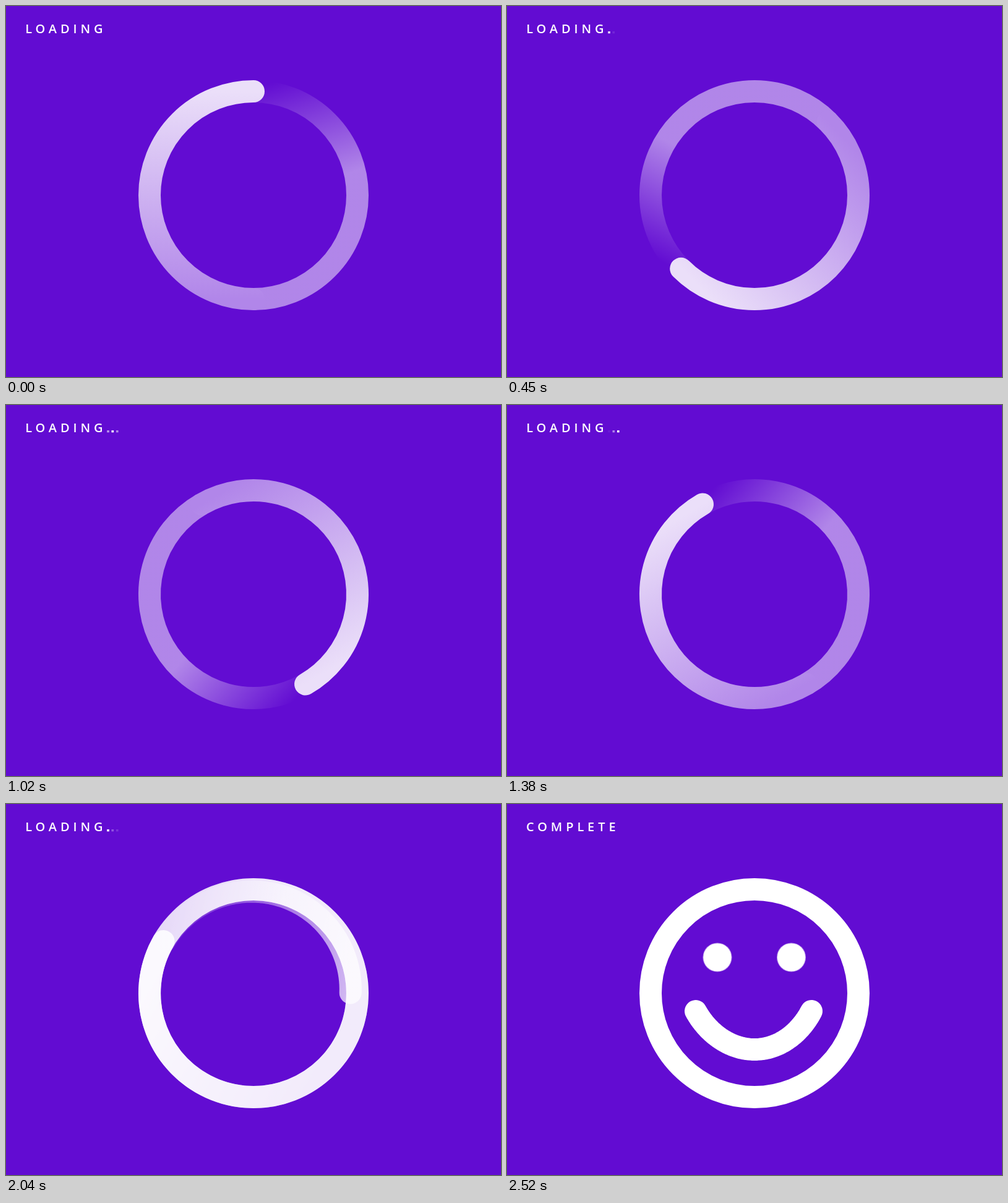
These frames come from a looping animation (800x600 px, 4.52 s). An HTML page with a canvas:

```html
<!DOCTYPE html>
<html lang="en">
<head>
<meta charset="utf-8">
<title>Loader</title>
<style>
  html, body { margin: 0; width: 100%; height: 100%; overflow: hidden; background: #620cd2; }
  canvas { display: block; width: 800px; height: 600px; }
</style>
</head>
<body>
<canvas id="stage" width="800" height="600"></canvas>
<script>
const ctx = document.getElementById('stage').getContext('2d');
const LOOP = 4520, STEP = 30, LAST = 2520;
const BG = [98, 12, 210];
const CX = 400, CY = 306, R = 168, W = 36;
const RAD = Math.PI / 180;

const clamp = v => Math.max(0, Math.min(1, v));
const ramp = (t, from, to) => clamp((t - from) / (to - from));
const lerp = (a, b, k) => a + (b - a) * k;
const easeInOut = u => u < 0.5 ? 2 * u * u : 1 - 2 * (1 - u) * (1 - u);
const white = a => `rgba(255,255,255,${a})`;
const tint = a => `rgb(${BG.map(c => Math.round(lerp(c, 255, a))).join(',')})`;

function gradient(x0, y0, x1, y1, from, to) {
  const g = ctx.createLinearGradient(x0, y0, x1, y1);
  g.addColorStop(0, from);
  g.addColorStop(1, to);
  return g;
}

function arc(from, to, style, cap) {
  ctx.beginPath();
  ctx.arc(0, 0, R, (from - 90) * RAD, (to - 90) * RAD);
  ctx.lineCap = cap;
  ctx.strokeStyle = style;
  ctx.stroke();
}

function drawRing(t) {
  const solid = ramp(t, 1440, 2160);
  if (solid < 1) {
    ctx.save();
    ctx.rotate(t * 0.5 * RAD);
    arc(0, 180, gradient(25, -181, 78, -12, white(0), white(0.5)), 'butt');
    arc(180, 360, gradient(0, R, 0, -R, tint(0.5), tint(0.87)), 'round');
    ctx.restore();
  }
  if (solid > 0) arc(0, 360, white(solid), 'butt');
}

function cubic(a, b, c, d, u) {
  const v = 1 - u;
  return v * v * v * a + 3 * v * v * u * b + 3 * v * u * u * c + u * u * u * d;
}

// Smile curve, left to right, relative to the ring centre
function smile(k) {
  const u = k * 2;
  return u < 1
    ? [cubic(-95, -77, -42, 0, u), cubic(29, 62, 91, 91, u)]
    : [cubic(0, 42, 75, 92, u - 1), cubic(91, 91, 62, 29, u - 1)];
}

// The mouth peels off the ring, leading end first, and turns into the smile
function drawMouth(t) {
  if (t <= 1890) return;
  const u = ramp(t, 1890, LAST);
  const turn = t < 2040
    ? -165 - (2040 - t) * 0.5
    : -165 * Math.pow(1 - ramp(t, 2040, LAST), 1.5);
  const points = [];
  for (let i = 0; i <= 60; i++) {
    const k = i / 60;
    const s = easeInOut(Math.pow(u, 0.87 + 0.73 * k));
    const a = (255 - 150 * k) * RAD;
    const [x, y] = smile(k);
    points.push([lerp(R * Math.sin(a), x, s), lerp(-R * Math.cos(a), y, s)]);
  }
  ctx.save();
  ctx.rotate(turn * RAD);
  ctx.beginPath();
  points.forEach(p => ctx.lineTo(...p));
  ctx.lineCap = ctx.lineJoin = 'round';
  ctx.strokeStyle = gradient(...points[0], ...points[60],
    white(ramp(t, 1890, 2100)), white(ramp(t, 2010, 2310)));
  ctx.stroke();
  ctx.restore();
}

function disc(x, y, r, alpha) {
  ctx.beginPath();
  ctx.arc(x, y, r, 0, 2 * Math.PI);
  ctx.fillStyle = white(alpha);
  ctx.fill();
}

function drawEyes(t) {
  const k = ramp(t, 2310, LAST);
  if (!k) return;
  const size = 1 - (1 - k) * (1 - k);
  for (const x of [-60, 59.5]) {
    disc(x, -58, 23.6 * size, 0.5 * k);
    disc(x, -58, 22.6 * size, k);
  }
}

// Each dot: position, rise start, rise end, fall start, fall end
const DOTS = [
  [165, 150, 510, 720, 1420],
  [172.3, 400, 860, 1020, 1720],
  [179.8, 740, 1300, 1400, 2160]
];

function pulse(t, a, b, c, d) {
  return Math.min(ramp(t, a, b), 1 - ramp(t, c, d));
}

function drawLabel(t) {
  const swap = ramp(t, 2190, 2460);
  const out = 1 - clamp(swap * 2), into = clamp(swap * 2 - 1);
  ctx.font = '600 20px "Open Sans", "Noto Sans", sans-serif';
  ctx.letterSpacing = '5.9px';
  ctx.textBaseline = 'alphabetic';
  ctx.fillStyle = white(out);
  ctx.fillText('LOADING', 31.2, 44);
  ctx.fillStyle = white(into);
  ctx.fillText('COMPLETE', 31, 44);
  for (const [x, ...keys] of DOTS) {
    const a = Math.max(pulse(t, ...keys), pulse(t - 1500, ...keys));
    ctx.fillStyle = white(a * out);
    ctx.fillRect(x - 1.8, 41, 3.6, 3.4);
  }
}

function draw(now) {
  const t = Math.min(LAST, Math.floor((now % LOOP) / STEP) * STEP);
  ctx.fillStyle = tint(0);
  ctx.fillRect(0, 0, 800, 600);
  drawLabel(t);
  ctx.save();
  ctx.translate(CX, CY);
  ctx.lineWidth = W;
  drawRing(t);
  drawMouth(t);
  drawEyes(t);
  ctx.restore();
}

const start = performance.now();
function tick() {
  draw(performance.now() - start);
  requestAnimationFrame(tick);
}
tick();
</script>
</body>
</html>
```
